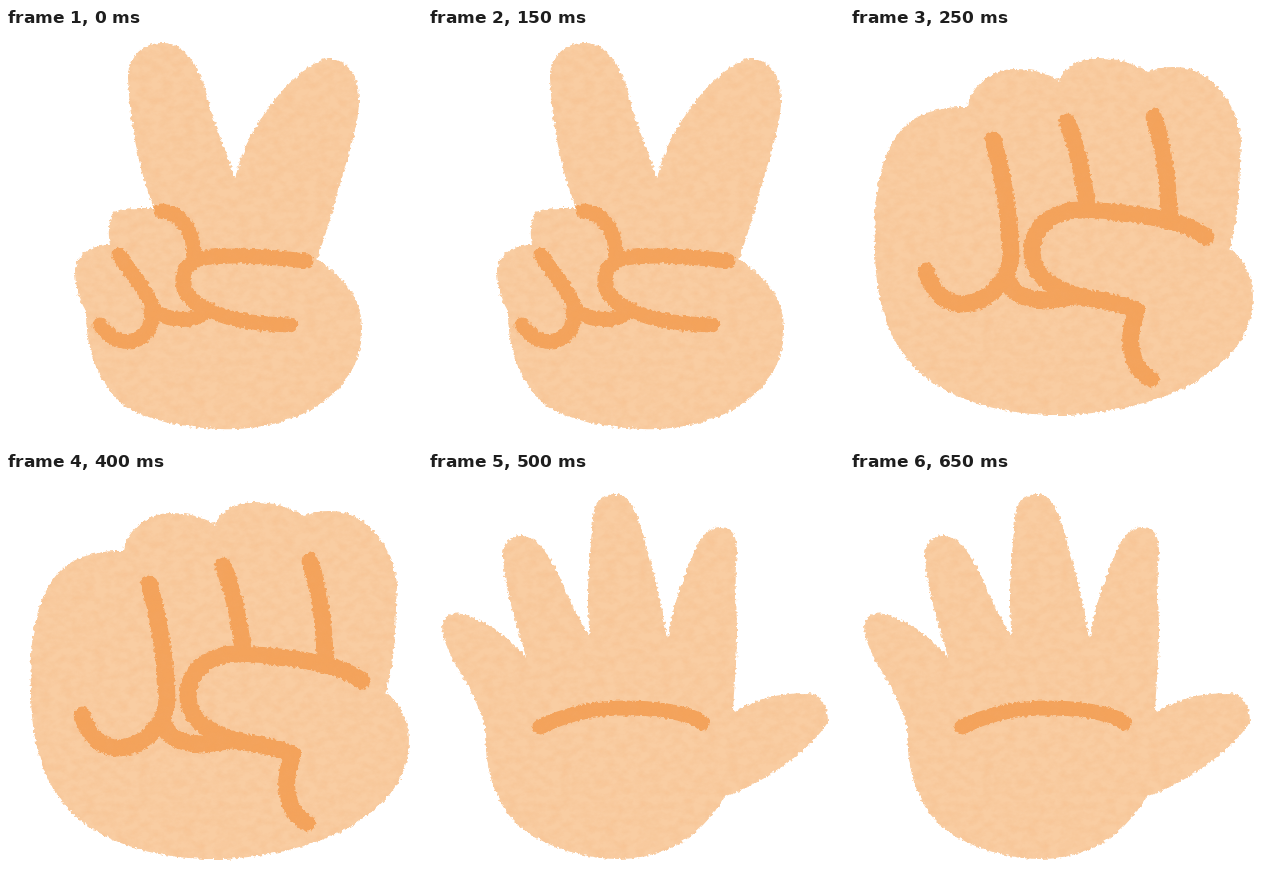
Animation of 416 by 416 pixels, one loop 0.75 s. Source, as an HTML page:

```html
<!DOCTYPE html>
<html lang="en">
<head>
<meta charset="utf-8">
<title>Rock paper scissors</title>
<style>
  html, body { margin: 0; width: 100%; height: 100%; overflow: hidden; background: #fff; }
  svg { display: block; width: 100vw; height: 100vh; }
  .skin { fill: #f9cda2; }
  .lines { fill: none; stroke: #f4a35b; stroke-linecap: round; stroke-linejoin: round; }
</style>
</head>
<body>
<svg viewBox="0 0 416 416" xmlns="http://www.w3.org/2000/svg">
  <defs>
    <!-- Ragged crayon edge with faint paper grain -->
    <filter id="crayon" filterUnits="userSpaceOnUse" x="0" y="0" width="416" height="416" color-interpolation-filters="sRGB">
      <feTurbulence type="fractalNoise" baseFrequency="0.3" numOctaves="2" seed="4" result="grain"/>
      <feDisplacementMap in="SourceGraphic" in2="grain" scale="5" xChannelSelector="R" yChannelSelector="G" result="shape"/>
      <feTurbulence type="fractalNoise" baseFrequency="0.09 0.13" numOctaves="3" seed="9"/>
      <feColorMatrix values="0 0 0 0 0.95  0 0 0 0 0.66  0 0 0 0 0.42  0.4 0 0 0 -0.14" result="blotches"/>
      <feComposite in="blotches" in2="shape" operator="in" result="paper"/>
      <feMerge><feMergeNode in="shape"/><feMergeNode in="paper"/></feMerge>
    </filter>
  </defs>

  <g class="pose" filter="url(#crayon)">
    <path class="skin" d="M148 180C134 145 124 98 122 50C122 26 140 14 158 15C180 15 195 40 203 75C210 105 222 124 229 151C236 120 250 95 270 70C285 52 305 34 322 30C340 32 353 45 353 72C353 100 338 140 330 170C323 195 317 215 311 231C335 248 356 268 356 300C356 342 332 370 292 388C260 400 235 402 215 401C180 400 140 392 118 378C92 352 80 325 80 283C72 270 69 255 69 243C70 227 84 217 104 217C102 205 102 190 108 184C118 179 135 180 148 180Z"/>
    <path class="lines" stroke-width="15" d="M155 183C174 184 189 203 188 230M300 233C260 228 215 226 193 231C172 238 172 264 190 275C215 292 250 296 284 297M113 227C126 246 140 262 147 281C155 290 183 297 197 285M94 297C108 315 120 316 132 311C142 306 148 295 145 281"/>
  </g>

  <g class="pose" filter="url(#crayon)">
    <path class="skin" d="M117 79C122 55 145 41 165 41C185 41 200 46 209 53C215 38 232 30 248 30C268 30 285 36 298 44C315 37 340 36 358 50C380 68 391 95 391 115C389 150 390 190 380 220C392 230 403 248 403 268C403 310 376 337 338 358C307 374 260 386 215 387C165 388 120 378 85 356C42 328 25 280 25 220C22 160 33 120 55 98C70 83 98 78 117 79Z"/>
    <path class="lines" stroke-width="17" d="M143 112C152 140 160 190 161 225C161 250 140 276 110 276C92 274 82 262 76 243M217 94C226 115 234 150 237 178M304 89C312 115 318 150 319 185M356 209C335 192 290 185 235 182C200 181 182 200 182 225C183 248 205 262 228 268C250 273 275 275 287 283C275 310 280 340 301 351M159 254C165 272 190 276 226 268"/>
  </g>

  <g class="pose" filter="url(#crayon)">
    <path class="skin" d="M57 255C52 235 40 213 31 198C20 180 14 165 14 153C15 143 25 139 38 143C60 150 80 165 98 185C88 150 76 115 75 85C75 68 85 62 95 63C112 65 125 90 135 112C142 130 152 150 162 164C157 120 163 75 165 45C167 25 180 22 188 22C205 22 212 50 220 80C230 110 233 140 240 166C243 140 255 105 267 77C275 60 285 55 293 55C305 56 309 65 309 80C306 110 309 130 309 160C309 190 306 215 305 240C325 228 350 221 380 221C393 221 400 235 400 250C385 275 340 310 296 325C285 345 265 366 245 375C225 384 205 387 190 387C150 387 105 370 85 348C65 325 57 295 57 255Z"/>
    <path class="lines" stroke-width="15" d="M112 255C140 241 170 236 196 236C225 236 262 240 274 251"/>
  </g>
</svg>
<script>
  const HOLD = 250;
  const poses = [...document.querySelectorAll('.pose')];
  const start = performance.now();

  function draw(time) {
    const current = Math.floor(time / HOLD) % poses.length;
    poses.forEach((pose, i) => { pose.style.display = i === current ? '' : 'none'; });
  }

  function tick(now) {
    draw(Math.max(0, now - start));
    requestAnimationFrame(tick);
  }

  draw(0);
  requestAnimationFrame(tick);
</script>
</body>
</html>
```
